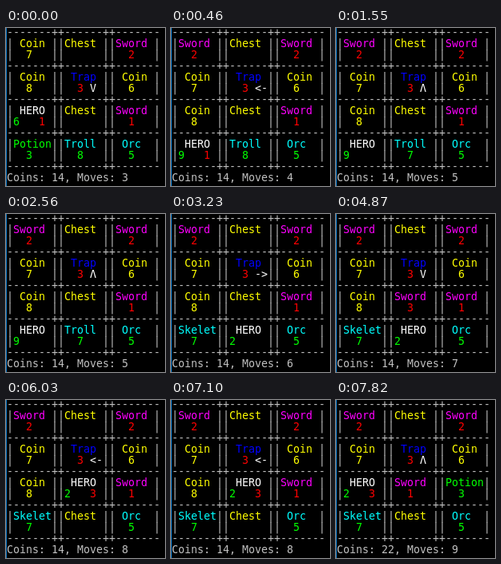
An HTML page that plays this animation: 199x198 px, repeating every 8000 ms.

```html
<!DOCTYPE html>
<html lang="en">
<head>
<meta charset="utf-8">
<title>Dungeon cards</title>
<style>
html, body { margin: 0; width: 100%; height: 100%; overflow: hidden; background: #000; }
svg { display: block; width: 199px; height: 198px; }
text { font: 13.29px "DejaVu Sans Mono", "Liberation Mono", monospace; white-space: pre; }
</style>
</head>
<body>
<svg viewBox="0 0 199 198">
  <rect width="199" height="198" fill="#000"/>
  <rect width="1" height="198" fill="#0b78c8"/>
  <g id="grid"></g>
  <g id="cards"></g>
</svg>
<script>
const LOOP = 8000;
const CELL_W = 8, LINE_H = 14, LEFT = 1, BASE = 10;
const GRAY = '#c0c0c0', RED = '#ff0000', GREEN = '#00ff00', YELLOW = '#ffff00', CYAN = '#00ffff';

// card name: [name colour, value colour, indent]
const KINDS = {
  Coin: [YELLOW, YELLOW, 1],
  Chest: [YELLOW, YELLOW, 0],
  Sword: ['#ff00ff', RED, 0],
  Trap: ['#0000ff', RED, 1],
  Potion: [GREEN, GREEN, 0],
  Troll: [CYAN, GREEN, 0],
  Skelet: [CYAN, GREEN, 0],
  Orc: [CYAN, GREEN, 1],
  HERO: ['#ffffff', GREEN, 1]
};
const ARROWS = ['V', '<-', 'Λ', '->'];

// each turn: end time, coins, cards in reading order
const TOP = 'Sword 2,Chest,Sword 2,Coin 7,Trap 3,Coin 6,';
const TURNS = [
  [460, 14, 'Coin 7,Chest,Sword 2,Coin 8,Trap 3,Coin 6,HERO 6 1,Chest,Sword 1,Potion 3,Troll 8,Orc 5'],
  [1550, 14, TOP + 'Coin 8,Chest,Sword 1,HERO 9 1,Troll 8,Orc 5'],
  [3230, 14, TOP + 'Coin 8,Chest,Sword 1,HERO 9,Troll 7,Orc 5'],
  [4870, 14, TOP + 'Coin 8,Chest,Sword 1,Skelet 7,HERO 2,Orc 5'],
  [6030, 14, TOP + 'Coin 8,Sword 3,Sword 1,Skelet 7,HERO 2,Orc 5'],
  [7820, 14, TOP + 'Coin 8,HERO 2 3,Sword 1,Skelet 7,Chest,Orc 5'],
  [LOOP, 22, TOP + 'HERO 2 3,Sword 1,Potion 3,Skelet 7,Chest,Orc 5']
];

const grid = document.getElementById('grid');
const cards = document.getElementById('cards');

// Writes a string on the character grid.
function put(parent, col, row, str, color) {
  const t = document.createElementNS('http://www.w3.org/2000/svg', 'text');
  t.setAttribute('x', [...str].map((_, i) => LEFT + (col + i) * CELL_W).join(' '));
  t.setAttribute('y', BASE + row * LINE_H);
  t.setAttribute('fill', color);
  t.textContent = str;
  parent.append(t);
}

function drawGrid() {
  for (let row = 0; row < 13; row++) {
    if (row % 3 === 0) put(grid, 0, row, '-------++------++-------', GRAY);
    else for (const col of [0, 7, 8, 15, 16, 23]) put(grid, col, row, '|', GRAY);
  }
}

function drawCard(card, i, turn) {
  const [name, value, weapon] = card.split(' ');
  const [nameColor, valueColor, indent] = KINDS[name];
  const col = 1 + (i % 3) * 8, row = 1 + Math.floor(i / 3) * 3;
  put(cards, col + indent, row, name, nameColor);
  if (value) put(cards, col + (name === 'HERO' ? 0 : 2), row + 1, value, valueColor);
  if (weapon) put(cards, col + 4, row + 1, weapon, RED);
  if (name === 'Trap') put(cards, col + 4, row + 1, ARROWS[turn % 4], '#ffffff');
}

function drawTurn(turn) {
  const [, coins, deck] = TURNS[turn];
  cards.replaceChildren();
  deck.split(',').forEach((card, i) => drawCard(card, i, turn));
  put(cards, 0, 13, `Coins: ${coins}, Moves: ${turn + 3}`, GRAY);
}

let shown = -1;
const start = performance.now();
function tick() {
  const time = (performance.now() - start) % LOOP;
  const turn = TURNS.findIndex(([end]) => time < end);
  if (turn !== shown) drawTurn(shown = turn);
  requestAnimationFrame(tick);
}

drawGrid();
tick();
</script>
</body>
</html>
```
